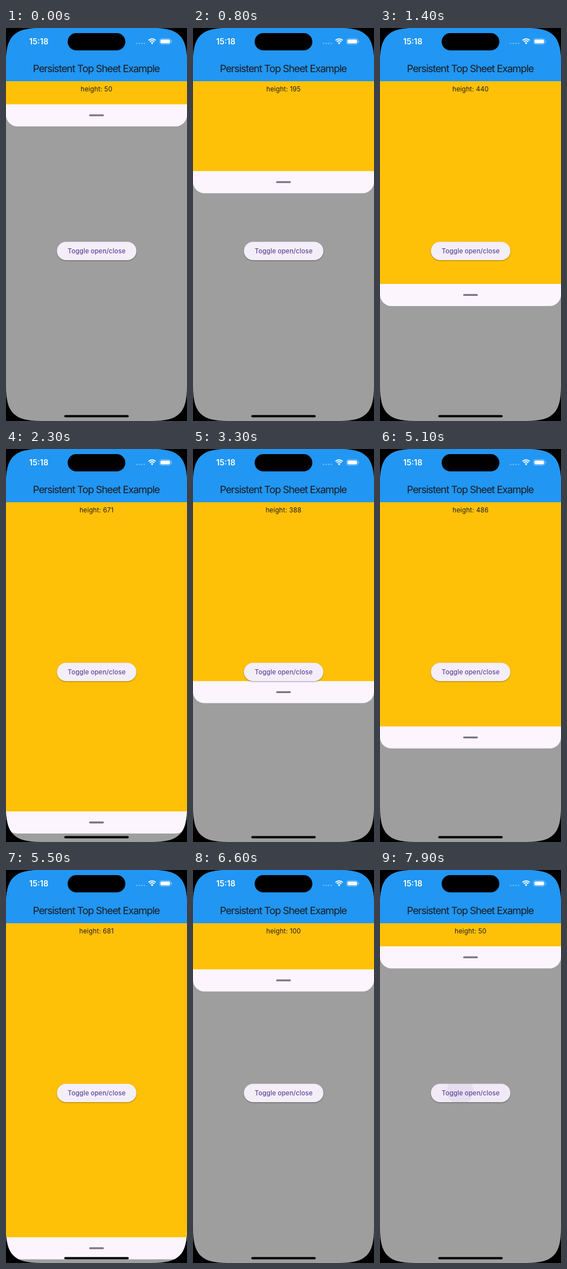
An HTML page with a canvas for the animation above (8000 ms loop, 320 px wide and 694 px high).

```html
<!DOCTYPE html>
<html lang="en">
<head>
<meta charset="utf-8">
<title>Persistent top sheet</title>
<style>
html, body { margin: 0; width: 100%; height: 100%; overflow: hidden; background: #000; }
canvas { display: block; width: 320px; height: 694px; }
</style>
</head>
<body>
<canvas id="stage"></canvas>
<script>
const W = 320, H = 694, LOOP = 8000, TICK = 100;
const PT = W / 393;            // one logical point in pixels
const BAR = 94, GRIP = 39;     // app bar bottom, grip area height
const FONT = 'Inter, Roboto, sans-serif';

const canvas = document.getElementById('stage');
const ratio = window.devicePixelRatio || 1;
canvas.width = W * ratio;
canvas.height = H * ratio;
const ctx = canvas.getContext('2d');
ctx.scale(ratio, ratio);

// start, end, height from, height to, ease bias
const moves = [
  [400, 1700, 50, 480, 0.8],
  [1800, 2500, 480, 689, 0.6],
  [2800, 3700, 689, 326, 0.518],
  [3800, 4400, 326, 50, 0.6],
  [4700, 5600, 50, 689, 0.581],
  [5600, 6900, 689, 50, 0.718]
];

function sheetHeight(t) {
  let h = 50;
  for (const [start, end, from, to, bias] of moves) {
    if (t <= start) break;
    const p = Math.min(1, (t - start) / (end - start)) ** bias;
    h = from + (to - from) * p * p * (3 - 2 * p);
  }
  return h;
}

function rect(x, y, w, h, color) {
  ctx.fillStyle = color;
  ctx.fillRect(x, y, w, h);
}

function round(x, y, w, h, r, color) {
  ctx.beginPath();
  ctx.roundRect(x, y, w, h, r);
  ctx.fillStyle = color;
  ctx.fill();
}

function disc(x, y, r, color) {
  ctx.beginPath();
  ctx.arc(x, y, r, 0, Math.PI * 2);
  ctx.fillStyle = color;
  ctx.fill();
}

function label(text, x, y, size, weight, color, spacing) {
  ctx.font = `${weight} ${size}px ${FONT}`;
  ctx.letterSpacing = spacing + 'px';
  ctx.textAlign = 'center';
  ctx.fillStyle = color;
  ctx.fillText(text, x + spacing / 2, y);
}

// Smooth device outline
function screenPath() {
  const a = 62, b = 14.5;
  ctx.beginPath();
  ctx.moveTo(0, a);
  ctx.bezierCurveTo(0, b, b, 0, a, 0);
  ctx.lineTo(W - a, 0);
  ctx.bezierCurveTo(W - b, 0, W, b, W, a);
  ctx.lineTo(W, H - a);
  ctx.bezierCurveTo(W, H - b, W - b, H, W - a, H);
  ctx.lineTo(a, H);
  ctx.bezierCurveTo(b, H, 0, H - b, 0, H - a);
  ctx.closePath();
}

function drawSheet(h) {
  const y = BAR + h * PT;
  round(0, BAR, W, y + GRIP - BAR, [0, 0, 20, 20], '#fcf5fe');
  rect(0, BAR, W, y - BAR, '#ffc107');
  round(147, y + 17.8, 26, 3.3, 1.65, '#79747e');
  label('height: ' + Math.round(h), 160, 112.3, 11.4, 400, '#1d1b20', 0.2);
}

function drawButton(t) {
  ctx.save();
  ctx.shadowColor = 'rgba(0,0,0,0.38)';
  ctx.shadowBlur = 2 * ratio;
  ctx.shadowOffsetY = ratio;
  round(90, 377.5, 140.5, 32.5, 16.25, '#f4eef8');
  ctx.restore();
  if (t >= 7900) {
    ctx.save();
    ctx.beginPath();
    ctx.roundRect(90, 377.5, 140.5, 32.5, 16.25);
    ctx.clip();
    rect(90, 377, 141, 33, 'rgba(103,80,164,0.02)');
    disc(141.5, 390.5, 23.5, 'rgba(103,80,164,0.08)');
    ctx.restore();
  }
  label('Toggle open/close', 160.2, 398.1, 11.4, 500, '#5f489b', 0.08);
}

function drawStatus() {
  round(109, 9, 102, 30.5, 15.25, '#000');
  label('15:18', 58, 28.9, 14, 600, '#fff', 0);
  for (let i = 0; i < 4; i++) disc(231 + i * 4.5, 27.3, 1.3, 'rgba(255,255,255,0.35)');

  ctx.strokeStyle = '#fff';
  ctx.lineWidth = 2;
  for (const r of [9, 5.6]) {
    ctx.beginPath();
    ctx.arc(258.3, 28.2, r, -Math.PI * 0.75, -Math.PI * 0.25);
    ctx.stroke();
  }
  ctx.beginPath();
  ctx.moveTo(258.3, 29);
  ctx.arc(258.3, 28.2, 3, -Math.PI * 0.75, -Math.PI * 0.25);
  ctx.closePath();
  ctx.fillStyle = '#fff';
  ctx.fill();

  ctx.strokeStyle = 'rgba(255,255,255,0.45)';
  ctx.lineWidth = 0.9;
  ctx.beginPath();
  ctx.roundRect(271.4, 18.6, 20, 10.2, 3.3);
  ctx.stroke();
  round(273, 20.2, 16.9, 7, 2, '#fff');
  round(292.4, 22, 1.2, 3.4, [0, 1, 1, 0], 'rgba(255,255,255,0.5)');
}

function draw(t) {
  rect(0, 0, W, H, '#000');
  ctx.save();
  screenPath();
  ctx.clip();
  rect(0, 0, W, H, '#9e9e9e');
  rect(0, 0, W, BAR, '#2196f3');
  drawSheet(sheetHeight(t));
  drawButton(t);
  label('Persistent Top Sheet Example', 160, 77.6, 17.9, 400, '#1d1b20', -1);
  drawStatus();
  round(103, 683.4, 114, 4.1, 2.05, '#000');
  ctx.restore();
}

const begin = performance.now();
function loop() {
  const t = (performance.now() - begin) % LOOP;
  draw(Math.floor(t / TICK) * TICK);
  requestAnimationFrame(loop);
}
draw(0);
requestAnimationFrame(loop);
</script>
</body>
</html>
```
